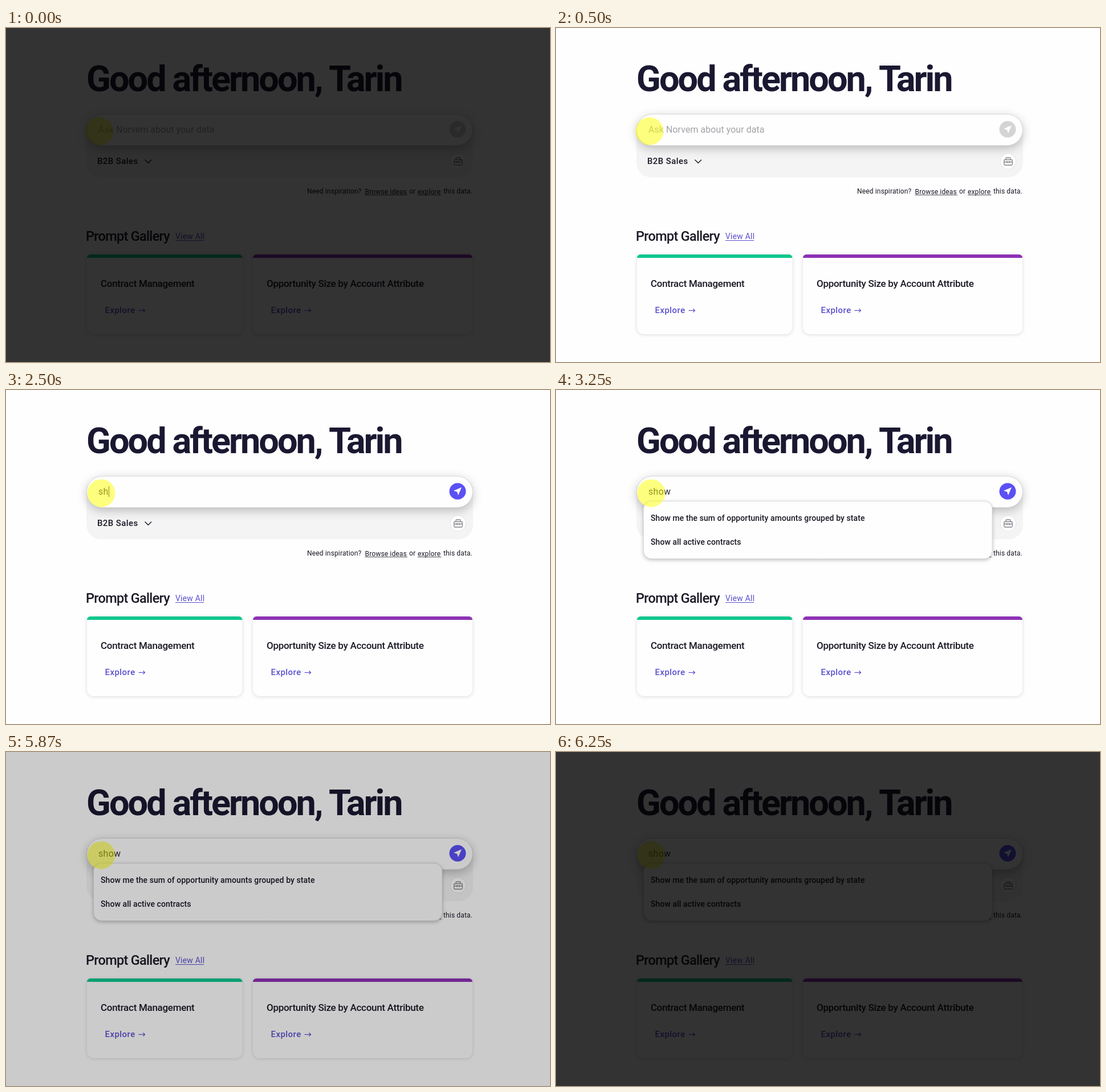
These frames come from a looping animation (954x587 px, 6370 ms). An HTML page with a canvas:

```html
<!DOCTYPE html>
<html lang="en">
<head>
<meta charset="utf-8">
<title>Ask your data</title>
<style>
html, body { margin: 0; width: 100%; height: 100%; overflow: hidden; background: #000; }
canvas { display: block; }
</style>
</head>
<body>
<canvas id="stage" width="954" height="587"></canvas>
<script>
const ctx = document.getElementById('stage').getContext('2d');
const LOOP = 6370;
const WORD = 'show';
const KEY_TICKS = [17, 19, 21, 23];
const INK = '#1b1926', LINK = '#5a4fcf';

const clamp = v => Math.max(0, Math.min(1, v));
const mix = (a, b, p) => `rgb(${a.map((v, i) => Math.round(v + (b[i] - v) * p)).join()})`;

// The picture advances eight times a second on a 10 ms clock.
const tickAt = ms => Math.floor((Math.floor(ms / 10) + 0.5) / 12.5);

function text(str, x, y, size, { weight = 400, color = INK, track = 0 } = {}) {
  ctx.font = `${weight} ${size}px Roboto, sans-serif`;
  ctx.letterSpacing = track + 'px';
  ctx.fillStyle = color;
  ctx.fillText(str, x, y);
  return ctx.measureText(str).width;
}

function box(x, y, w, h, r, fill, { border, shadow, blur = 0, dy = 0 } = {}) {
  ctx.save();
  ctx.beginPath();
  ctx.roundRect(x, y, w, h, r);
  if (shadow) {
    ctx.shadowColor = shadow;
    ctx.shadowBlur = blur;
    ctx.shadowOffsetY = dy;
  }
  ctx.fillStyle = fill;
  ctx.fill();
  ctx.restore();
  if (border) {
    ctx.strokeStyle = border;
    ctx.lineWidth = 1;
    ctx.stroke();
  }
}

function disc(x, y, r, fill, border) {
  ctx.beginPath();
  ctx.arc(x, y, r, 0, Math.PI * 2);
  ctx.fillStyle = fill;
  ctx.fill();
  if (border) {
    ctx.strokeStyle = border;
    ctx.lineWidth = 1;
    ctx.stroke();
  }
}

function line(points, color, width = 1) {
  ctx.beginPath();
  points.forEach(([x, y]) => ctx.lineTo(x, y));
  ctx.strokeStyle = color;
  ctx.lineWidth = width;
  ctx.stroke();
}

function underline(x1, x2, y, color) {
  line([[x1, y], [x2, y]], color);
}

function toolbox() {
  disc(793, 234.5, 14, '#fefefe', '#e2e2e4');
  ctx.strokeStyle = '#85858c';
  ctx.lineWidth = 1.3;
  ctx.beginPath();
  ctx.roundRect(785.7, 231.5, 14.6, 9.5, 1.5);
  ctx.roundRect(789, 228, 8, 3.5, 1);
  ctx.moveTo(785.7, 235.5);
  ctx.lineTo(800.3, 235.5);
  ctx.moveTo(791, 234);
  ctx.lineTo(791, 237.5);
  ctx.moveTo(795, 234);
  ctx.lineTo(795, 237.5);
  ctx.stroke();
}

function sendButton(active) {
  disc(792, 178, 14.5, mix([212, 212, 214], [91, 80, 245], active));
  ctx.beginPath();
  [[799, 171], [785, 177], [791, 179], [793, 185]].forEach(([x, y]) => ctx.lineTo(x, y));
  ctx.closePath();
  ctx.fillStyle = '#fff';
  ctx.fill();
}

function card(x, w, color, title) {
  box(x, 398, w, 140, [6, 6, 12, 12], '#fefefe', { shadow: 'rgba(40,40,70,.16)', blur: 6, dy: 1 });
  box(x, 398, w, 6, [6, 6, 0, 0], color);
  text(title, x + 24, 455, 17, { weight: 500, track: -0.3 });
  text('Explore', x + 31.5, 501, 15, { weight: 500, color: LINK, track: 0.45 });
  const ax = x + 90.5;
  line([[ax, 496.5], [ax + 11, 496.5]], LINK, 1.2);
  line([[ax + 8, 493.5], [ax + 11, 496.5], [ax + 8, 499.5]], LINK, 1.2);
}

function hints() {
  const small = { track: 0.15 };
  text('Need inspiration?', 528, 291, 12, small);
  text('Browse ideas', 629.5, 292, 12, small);
  underline(629.5, 704, 293.5, '#55535f');
  text('or', 707, 291, 12, small);
  text('explore', 722, 292, 12, small);
  underline(722, 763.5, 293.5, '#55535f');
  text('this data.', 767, 291, 12, small);
}

function caretOn(k) {
  if (k < 16) return (k >= 8 && k < 11) || k >= 13;
  if (k < 23) return k >= 17;
  return k < 47 && (k - 23) % 6 < 3;
}

function searchBar(k, typed) {
  box(141, 170, 678, 92.5, [0, 0, 26, 26], '#f4f4f5');
  box(141.5, 151.5, 677, 55, 27.5, '#fefefe', { border: '#d6d6da', shadow: 'rgba(0,0,0,.25)', blur: 17, dy: 5 });
  text('B2B Sales', 160, 239, 15, { weight: 500, track: 0.4 });
  line([[243.5, 231.5], [249.3, 237.3], [255.1, 231.5]], INK, 1.4);
  toolbox();
  sendButton(clamp((k - 16) / 3));

  let end = 162;
  if (typed) end += text(WORD.slice(0, typed), 162, 184, 16, { color: '#2b2938', track: 0.3 });
  else text('Ask Norvem about your data', 162, 184, 16, { color: '#a3a3a8', track: 0.05 });
  if (caretOn(k)) {
    ctx.fillStyle = INK;
    ctx.fillRect(Math.round(end), 169, 1, 19);
  }
}

function suggestions(alpha) {
  if (!alpha) return;
  ctx.save();
  ctx.globalAlpha = alpha;
  box(153.5, 195.5, 611.5, 101, 14, '#fefefe', { border: '#dcdce0', shadow: 'rgba(0,0,0,.28)', blur: 7, dy: 2 });
  const row = { weight: 500, track: 0.08 };
  text('Show me the sum of opportunity amounts grouped by state', 166, 230, 14, row);
  text('Show all active contracts', 166, 272, 14, row);
  ctx.restore();
}

function draw(ms) {
  const k = tickAt(ms);
  const typed = KEY_TICKS.filter(t => k >= t).length;
  ctx.fillStyle = '#fefefe';
  ctx.fillRect(0, 0, 954, 587);

  text('Good afternoon, Tarin', 141, 111, 63, { weight: 700, color: '#1a1831', track: -3 });
  searchBar(k, typed);
  hints();
  text('Prompt Gallery', 140, 374, 23.5, { weight: 500, track: -0.7 });
  text('View All', 297, 371, 14, { color: LINK, track: 0.2 });
  underline(297, 347, 373.5, LINK);
  card(142, 272.5, '#0cc78d', 'Contract Management');
  card(433, 385, '#8d31b5', 'Opportunity Size by Account Attribute');
  suggestions(clamp((k - 21) / 4));
  disc(164 + 3 * clamp((k - 4) / 2), 181.3, 24.4, 'rgba(255,255,0,.5)');

  const light = Math.min(1, (k + 1) / 5, (51 - k) / 5);
  ctx.fillStyle = `rgba(0,0,0,${1 - light})`;
  ctx.fillRect(0, 0, 954, 587);
}

function frame(now) {
  draw(now % LOOP);
  requestAnimationFrame(frame);
}
draw(0);
requestAnimationFrame(frame);
</script>
</body>
</html>
```
